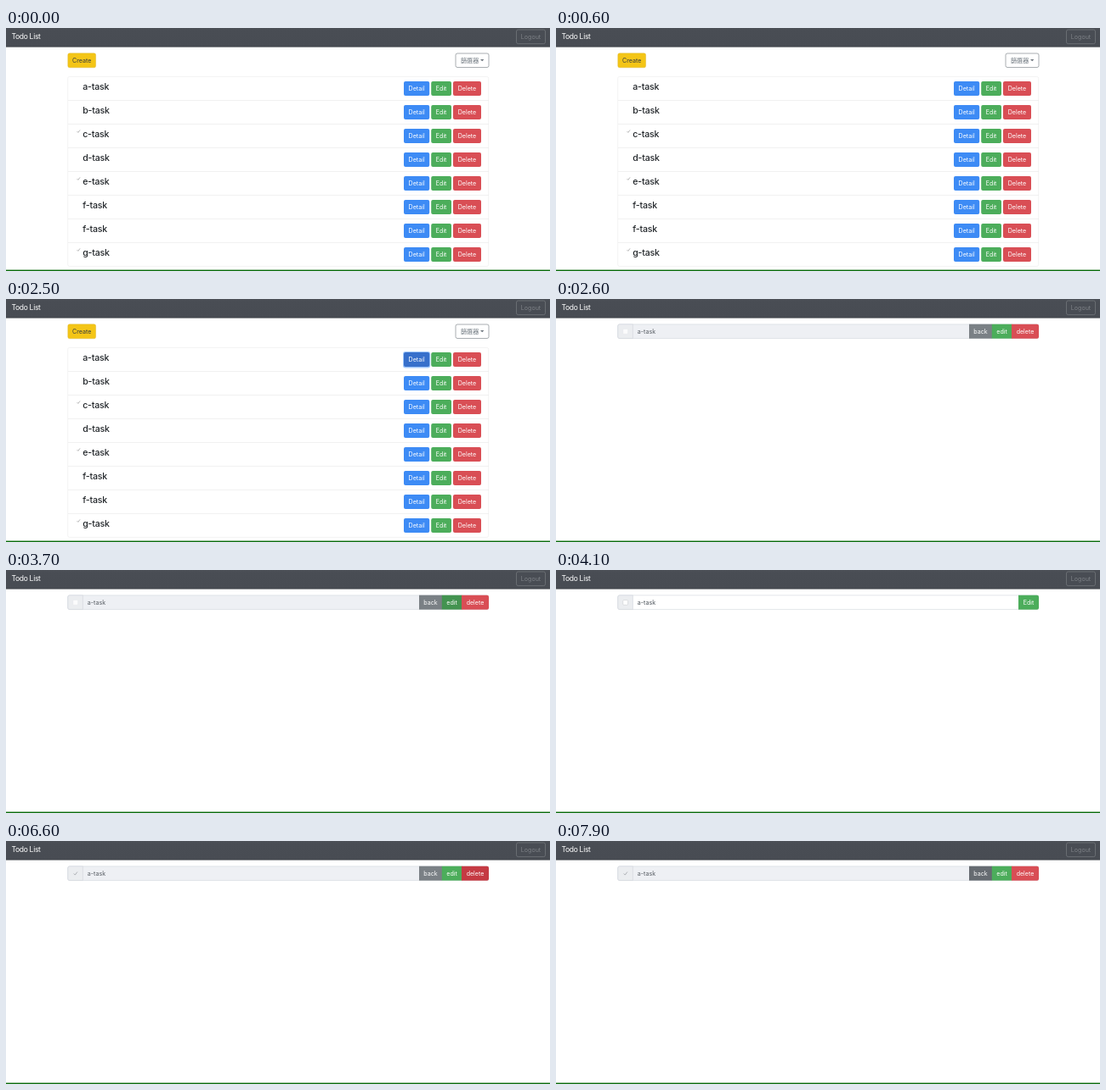
An HTML page with a canvas that plays this animation: 640 px wide and 287 px high, repeating every 8 s.

```html
<!DOCTYPE html>
<html lang="en">
<head>
<meta charset="utf-8">
<title>Todo List</title>
<style>
  html, body { margin: 0; width: 100%; height: 100%; overflow: hidden; background: #fff; }
  canvas { display: block; width: 640px; height: 287px; }
</style>
</head>
<body>
<canvas id="stage"></canvas>
<script>
const W = 640, H = 287, LOOP = 8000;
const canvas = document.getElementById('stage');
const ctx = canvas.getContext('2d');
const dpr = window.devicePixelRatio || 1;
canvas.width = W * dpr;
canvas.height = H * dpr;

const SANS = 'Inter, "Noto Sans CJK TC", "Noto Sans CJK", sans-serif';
const BLUE = [61, 139, 245], BLUE_DARK = [55, 112, 203];
const GREEN = [76, 173, 91], GREEN_DARK = [67, 147, 80];
const RED = [217, 78, 85], RED_DARK = [197, 58, 67];
const GRAY = [122, 128, 133], GRAY_DARK = [102, 107, 113];
const TASKS = ['a', 'b', 'c', 'd', 'e', 'f', 'f', 'g'];
const DONE = [2, 4, 7];

const ramp = (t, start, length = 150) => Math.min(1, Math.max(0, (t - start) / length));
const mix = (a, b, k) => `rgb(${a.map((v, i) => Math.round(v + (b[i] - v) * k))})`;

function label(text, x, y, color, { size = 7.1, weight = 400, align = 'left', spacing = 0 } = {}) {
  ctx.font = `${weight} ${size}px ${SANS}`;
  ctx.letterSpacing = spacing + 'px';
  ctx.textAlign = align;
  ctx.fillStyle = color;
  ctx.fillText(text, x, y);
}

function box(x, y, w, h, radius, fill, stroke, line = 0.6) {
  ctx.beginPath();
  ctx.roundRect(x, y, w, h, radius);
  if (fill) { ctx.fillStyle = fill; ctx.fill(); }
  if (stroke) { ctx.strokeStyle = stroke; ctx.lineWidth = line; ctx.stroke(); }
}

function button(text, x, y, w, fill, radius = 2, color = '#fff') {
  box(x, y, w, 17, radius, fill);
  label(text, x + w / 2, y + 11.1, color, { align: 'center' });
}

function tick(x, y, size, color, line) {
  ctx.beginPath();
  ctx.moveTo(x - size * 0.5, y);
  ctx.lineTo(x - size * 0.12, y + size * 0.4);
  ctx.lineTo(x + size * 0.5, y - size * 0.45);
  ctx.strokeStyle = color;
  ctx.lineWidth = line;
  ctx.stroke();
}

function frame() {
  ctx.fillStyle = '#fff';
  ctx.fillRect(0, 0, W, H);
  const bar = ctx.createLinearGradient(0, 0, 0, 22.6);
  bar.addColorStop(0, '#4c5057');
  bar.addColorStop(0.15, '#494d54');
  bar.addColorStop(0.9, '#484c53');
  bar.addColorStop(1, '#41454b');
  ctx.fillStyle = bar;
  ctx.fillRect(0, 0, W, 22.6);
  label('Todo List', 6.4, 13.2, '#fff', { size: 8.5, spacing: -0.28 });
  box(600.5, 2, 34, 16.6, 2, null, '#777b80', 0.7);
  label('Logout', 617.5, 12.8, '#7d8186', { align: 'center' });
  ctx.fillStyle = '#0a6c0c';
  ctx.fillRect(0, 285.6, W, 1.4);
}

function listPage(t) {
  button('Create', 72.8, 29.8, 32.8, '#f4c516', 2, '#343a40');
  box(72.8, 29.8, 32.8, 17, 2, null, '#d9b02a', 0.4);
  box(529, 30, 39, 16.5, 2, null, '#858b90', 0.7);
  label('篩選器', 535, 41, '#6c757d');
  ctx.beginPath();
  ctx.moveTo(558, 36.9);
  ctx.lineTo(562.4, 36.9);
  ctx.lineTo(560.2, 39.2);
  ctx.fillStyle = '#6c757d';
  ctx.fill();

  box(72.7, 57.4, 495, 224, 2, null, '#e6e6e6', 0.5);
  const press = ramp(t, 2200);
  TASKS.forEach((name, i) => {
    const y = 57.4 + i * 28;
    if (i) {
      ctx.fillStyle = '#e8e8e8';
      ctx.fillRect(73, y - 0.3, 495, 0.6);
    }
    if (DONE.includes(i)) tick(85.3, y + 68 - 57.4 - 2.2 + 0.2, 3.6, '#8c8c8c', 0.6);
    label(name + '-task', 90.2, y + 15.9, '#212529', { size: 10.6, weight: 500, spacing: -0.2 });
    const active = i ? 0 : press;
    if (active) box(467, y + 4.6, 32.2, 19.4, 3, `rgba(120,175,250,${0.7 * active})`);
    button('Detail', 468, y + 5.7, 30.2, mix(BLUE, BLUE_DARK, active));
    button('Edit', 500.2, y + 5.7, 23.8, mix(GREEN, GREEN, 0));
    button('Delete', 526, y + 5.7, 33, mix(RED, RED, 0));
  });
}

function taskField(fieldFill, textColor) {
  box(72.8, 29.9, 495, 16.7, 2, fieldFill, '#ced4da', 0.6);
  box(72.8, 29.9, 17.6, 16.7, [2, 0, 0, 2], '#ebedf0', '#ced4da', 0.6);
  label('a-task', 95.8, 40.9, textColor);
}

function detailPage(t) {
  const checked = t > 6000;
  taskField('#eef0f4', '#555b61');
  if (checked) tick(81.8, 38.4, 4.2, '#8e9297', 0.65);
  else box(78.8, 35.4, 5.8, 5.8, 1, '#fbfbfc', '#e3e5e8', 0.4);

  const back = ramp(t, 7650);
  const edit = checked ? ramp(t, 7350, 100) - ramp(t, 7650, 200) : ramp(t, 3550);
  const remove = checked ? 1 - ramp(t, 7350, 100) : 0;
  button('back', 486, 29.7, 27, mix(GRAY, GRAY_DARK, back), 0);
  button('edit', 512.8, 29.7, 23.6, mix(GREEN, GREEN_DARK, edit), 0);
  button('delete', 536, 29.7, 32, mix(RED, RED_DARK, remove), [0, 2, 2, 0]);
}

function editPage(t) {
  taskField('#fff', '#495057');
  if (t >= 5400) {
    box(78.6, 35.4, 6.2, 6.2, 1.2, '#4e83e0');
    tick(81.7, 38.5, 3.4, '#fff', 0.8);
  } else {
    box(78.8, 35.5, 5.8, 5.8, 1, '#fff', '#c4c6c9', 0.5);
  }
  const hover = ramp(t, 6050, 50), focus = ramp(t, 6250);
  if (focus) box(543, 28.6, 26, 19.2, 2, `rgba(150,210,160,${0.7 * focus})`);
  button('Edit', 544, 29.7, 24, mix(GREEN, GREEN_DARK, hover), [0, 2, 2, 0]);
}

function draw(now) {
  const t = now % LOOP;
  ctx.setTransform(dpr, 0, 0, dpr, 0, 0);
  frame();
  if (t < 2600) listPage(t);
  else if (t >= 3900 && t < 6500) editPage(t);
  else detailPage(t);
}

const start = performance.now();
function tickClock() {
  draw(performance.now() - start);
  requestAnimationFrame(tickClock);
}
tickClock();
</script>
</body>
</html>
```
